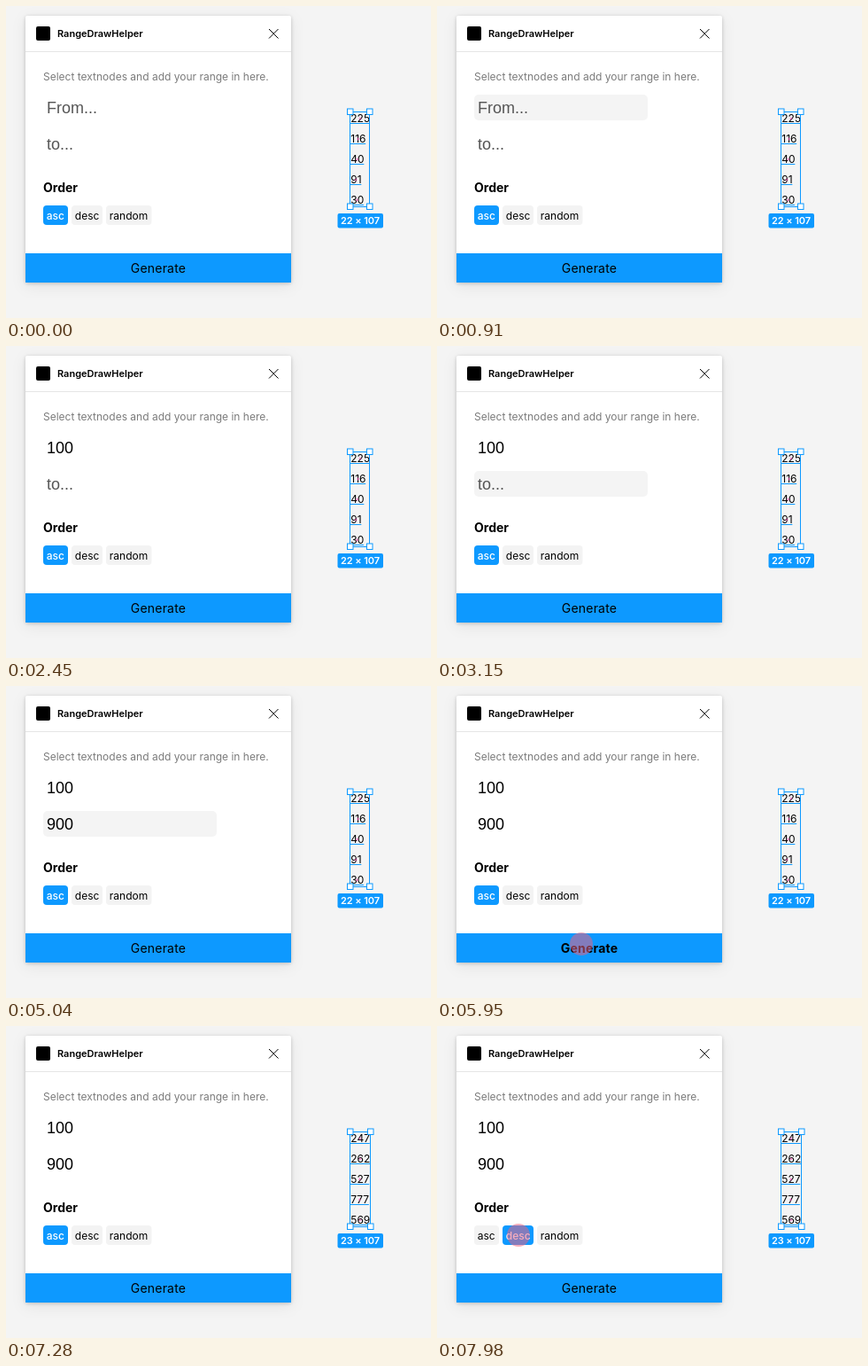
An HTML page for the animation above (8 s loop, 480 by 352 pixels).

```html
<!DOCTYPE html>
<html lang="en">
<head>
<meta charset="utf-8">
<title>Range plugin</title>
<style>
  html, body { margin: 0; width: 100%; height: 100%; overflow: hidden; background: #f4f4f4; }
  svg { display: block; width: 480px; height: 352px; font: 12px Inter, sans-serif; }
  .panel { fill: #fff; filter: drop-shadow(0 1px 2px rgba(0,0,0,.2)) drop-shadow(0 4px 8px rgba(0,0,0,.07)); }
  .title { font-size: 11px; font-weight: 600; }
  .hint { fill: #7b7b7b; }
  .field { fill: #f4f4f4; }
  .value { font: 18px "Liberation Sans", Arial, sans-serif; }
  .order { font-size: 14px; font-weight: 700; }
  .blue { fill: #0d99ff; }
  .generate { font-size: 14px; letter-spacing: .2px; text-anchor: middle; }
  .line { fill: none; stroke: #0d99ff; }
  .handle { fill: #fff; stroke: #0d99ff; }
  .size { font-size: 11px; font-weight: 600; fill: #fff; text-anchor: middle; letter-spacing: -.1px; }
  .tap { fill: #f0627f; }
</style>
</head>
<body>
<svg viewBox="0 0 480 352">
  <rect class="panel" x="22" y="11" width="300" height="301" rx="2"/>
  <rect x="34" y="23" width="16" height="16" rx="2"/>
  <text class="title" x="58" y="35">RangeDrawHelper</text>
  <path d="M297 26l10.500 10.500M307.500 26l-10.500 10.500" stroke="#000"/>
  <path d="M22 51.500h300" stroke="#e5e5e5"/>
  <text class="hint" x="42" y="84">Select textnodes and add your range in here.</text>
  <rect id="fromField" class="field" x="42" y="100" width="196" height="29" rx="5"/>
  <text id="from" class="value" x="46" y="121"></text>
  <rect id="toField" class="field" x="42" y="141" width="196" height="29" rx="5"/>
  <text id="to" class="value" x="46" y="162"></text>
  <text class="order" x="42" y="210">Order</text>
  <g id="options"></g>
  <path class="blue" d="M22 279h300v33h-300z"/>
  <text id="generate" class="generate" x="172" y="301">Generate</text>
  <g id="numbers"></g>
  <rect id="frame" class="line" x="388.500" y="119.500" height="107"/>
  <g id="handles"></g>
  <rect class="blue" x="374.500" y="234" width="51.500" height="16.500" rx="2"/>
  <text id="size" class="size" x="400" y="246.300"></text>
  <circle id="tap" class="tap" r="13"/>
</svg>
<script>
const LOOP = 8000;
const $ = id => document.getElementById(id);

function add(parent, tag, attrs, text = '') {
  const el = document.createElementNS('http://www.w3.org/2000/svg', tag);
  for (const key in attrs) el.setAttribute(key, attrs[key]);
  el.textContent = text;
  return parent.appendChild(el);
}

const options = [['asc', 42, 28], ['desc', 74, 35], ['random', 113, 51.5]].map(([name, x, width]) => ({
  box: add($('options'), 'rect', { x, y: 225, width, height: 22, rx: 4 }),
  label: add($('options'), 'text', { x: x + 3.8, y: 240.5 }, name)
}));

const rows = [0, 1, 2, 3, 4].map(i => {
  const y = 131 + i * 23;
  return {
    label: add($('numbers'), 'text', { x: 389.3, y }),
    rule: add($('numbers'), 'path', { class: 'line' }),
    mark: add($('numbers'), 'path', { stroke: '#f24fb5', 'stroke-opacity': .6 }),
    y
  };
});

const handles = [0, 1, 2, 3].map(i =>
  add($('handles'), 'rect', { class: 'handle', y: i < 2 ? 116 : 223, width: 6.5, height: 6.5 }));

const before = [225, 116, 40, 91, 30];
const after = [247, 262, 527, 777, 569];
const taps = [[1050, 140, 115], [2660, 140, 156], [5860, 163, 291], [7860, 92, 236]];

const clamp = v => Math.max(0, Math.min(1, v));
const within = (t, start, end) => t >= start && t < end;

function showInput(id, t, start, text, placeholder) {
  const count = t < start ? 0 : Math.floor((t - start) / 140) + 1;
  $(id).textContent = count ? text.slice(0, count) : placeholder;
  $(id).setAttribute('fill', count ? '#000' : '#555');
}

function showSelection(numbers, width) {
  rows.forEach(({ label, rule, mark, y }, i) => {
    label.textContent = numbers[i];
    const length = label.getComputedTextLength();
    rule.setAttribute('d', `M389 ${y + 1.5}h${length}`);
    mark.setAttribute('d', `M${389 + length / 2 - 1.5} ${y - 4}h3m-1.5 -1.5v3`);
  });
  $('frame').setAttribute('width', width);
  handles.forEach((h, i) => h.setAttribute('x', 385.5 + (i % 2) * width));
  $('size').textContent = `${width} × 107`;
}

function showTap(t) {
  const active = taps.find(([start]) => within(t, start, start + 490));
  $('tap').setAttribute('opacity', 0);
  if (!active) return;
  const [start, x, y] = active, age = t - start;
  $('tap').setAttribute('transform', `translate(${x} ${y})`);
  $('tap').setAttribute('opacity', .52 * Math.min(clamp(age / 90), clamp((490 - age) / 210)));
}

function render(t) {
  $('fromField').setAttribute('opacity', +within(t, 910, 2450));
  $('toField').setAttribute('opacity', +within(t, 2520, 5320));
  showInput('from', t, 1820, '100', 'From...');
  showInput('to', t, 3990, '900', 'to...');
  $('generate').setAttribute('font-weight', within(t, 5600, 6860) ? 700 : 400);

  const selected = t < 7910 ? 0 : 1;
  options.forEach(({ box, label }, i) => {
    box.setAttribute('fill', i === selected ? '#0d99ff' : '#f3f3f3');
    label.setAttribute('fill', i === selected ? '#fff' : '#000');
    label.setAttribute('font-weight', i === selected ? 500 : 400);
  });

  if (t < 6160) showSelection(before, 22);
  else showSelection(after, 23);
  showTap(t);
}

function tick() {
  render(performance.now() % LOOP);
  requestAnimationFrame(tick);
}
tick();
</script>
</body>
</html>
```
